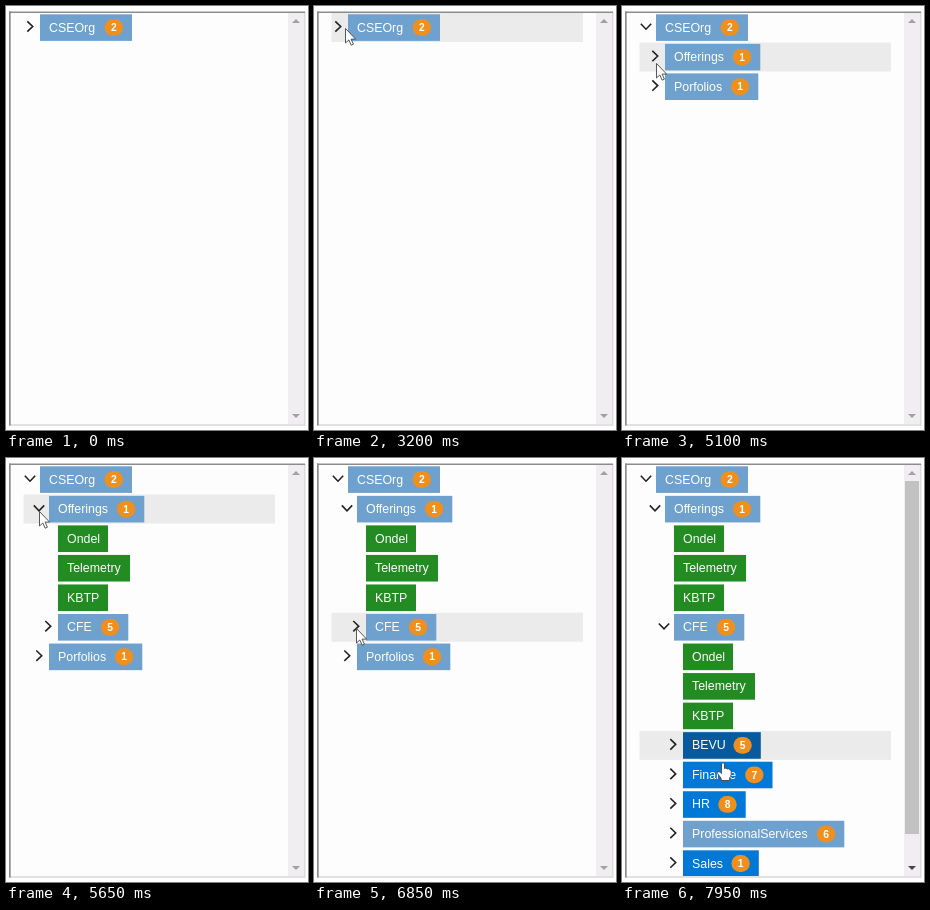
An HTML page with a canvas that plays this animation: 302 by 424 pixels, repeating every 8000 ms.

```html
<!DOCTYPE html>
<html lang="en">
<head>
<meta charset="utf-8">
<title>Tree view</title>
<style>
html, body { margin: 0; width: 100%; height: 100%; overflow: hidden; background: #fff; }
canvas { display: block; width: 302px; height: 424px; }
</style>
</head>
<body>
<canvas id="stage"></canvas>
<script>
const LOOP = 8000, PITCH = 29.54, FIRST_TOP = 8;
const canvas = document.getElementById('stage');
const ctx = canvas.getContext('2d');
const dpr = window.devicePixelRatio || 1;
canvas.width = 302 * dpr;
canvas.height = 424 * dpr;
ctx.scale(dpr, dpr);

// Fill and hover fill per node kind
const COLORS = {
  group: ['#6ea1ce', '#6397c6'],
  leaf: ['#228b22', '#1a651c'],
  unit: ['#0078d7', '#075a9d']
};
const node = (label, kind, width, count, openAt = Infinity, children = []) =>
  ({ label, kind, width, count, openAt, children });
const leaves = () => [node('Ondel', 'leaf', 50), node('Telemetry', 'leaf', 72), node('KBTP', 'leaf', 50)];

const tree = node('CSEOrg', 'group', 92, 2, 3850, [
  node('Offerings', 'group', 95.3, 1, 5550, [
    ...leaves(),
    node('CFE', 'group', 70.3, 5, 6980, [
      ...leaves(),
      node('BEVU', 'unit', 77.8, 5),
      node('Finance', 'unit', 89.5, 7),
      node('HR', 'unit', 62.7, 8),
      node('ProfessionalServices', 'group', 161.3, 6),
      node('Sales', 'unit', 75.8, 1)
    ])
  ]),
  node('Porfolios', 'group', 93.3, 1)
]);

// Pointer path: time, x, y
const PATH = [
  [1250, 254, 299], [1450, 186, 246], [1600, 186, 246], [1650, 185, 246], [1780, 185, 246],
  [2150, 92, 183], [2600, 47, 98], [2900, 36, 40], [3200, 31, 22], [3450, 33, 20],
  [3530, 33, 20], [3650, 24, 18], [4330, 24, 18], [4700, 30, 42], [5100, 34, 57],
  [5300, 33, 53], [6030, 33, 53], [6250, 44, 91.5], [6600, 43, 145], [6850, 42, 170],
  [7080, 42, 170], [7350, 87.5, 194], [7730, 87.5, 194], [7950, 101, 304.5], [8000, 101, 304.5]
];

function pointerAt(t) {
  if (t < PATH[0][0]) return null;
  const i = PATH.findIndex(p => p[0] > t);
  const [t0, x0, y0] = PATH[i - 1], [t1, x1, y1] = PATH[i];
  const k = (t - t0) / (t1 - t0);
  return { x: x0 + (x1 - x0) * k, y: y0 + (y1 - y0) * k };
}

function visibleRows(t, item = tree, depth = 0, rows = []) {
  rows.push({ ...item, depth, open: t >= item.openAt });
  if (t >= item.openAt) item.children.forEach(child => visibleRows(t, child, depth + 1, rows));
  return rows;
}

function rect(x, y, w, h, color) {
  ctx.fillStyle = color;
  ctx.fillRect(x, y, w, h);
}

function text(str, x, y, font, align) {
  ctx.font = font + ' "Liberation Sans", Arial, sans-serif';
  ctx.textAlign = align;
  ctx.fillStyle = '#fff';
  ctx.fillText(str, x, y);
}

function chevron(x, y, open) {
  ctx.save();
  ctx.translate(x, y);
  if (open) ctx.rotate(Math.PI / 2);
  ctx.strokeStyle = '#222';
  ctx.lineWidth = 1.6;
  ctx.stroke(new Path2D('M-2.7 -5.2L2.7 0L-2.7 5.2'));
  ctx.restore();
}

const buttonLeft = row => 34 + row.depth * 9;

function isOverButton(row, top, p) {
  const x = buttonLeft(row);
  return p.x >= x && p.x <= x + row.width && p.y >= top - 2 && p.y <= top + 28;
}

function drawRow(row, index, pointer) {
  const top = FIRST_TOP + index * PITCH, mid = top + 13.3, x = buttonLeft(row);
  const hovered = pointer && pointer.y >= top - 1.2 && pointer.y < top + PITCH - 1.2;
  if (hovered) rect(17.5, top - 1, 251.5, 29, '#ecebec');
  if (row.count) chevron(x - 10, mid - .8, row.open);
  rect(x, top + .3, row.width, 26.6, COLORS[row.kind][hovered && isOverButton(row, top, pointer) ? 1 : 0]);
  text(row.label, x + 9, mid + 4.2, '12.4px', 'left');
  if (row.count) {
    const cx = x + row.width - 18.2;
    ctx.fillStyle = '#ef8f1d';
    ctx.beginPath();
    ctx.roundRect(cx - 9.2, mid - 8.2, 18.4, 16.8, 8.4);
    ctx.fill();
    text(row.count, cx, mid + 3.9, 'bold 10.3px', 'center');
  }
}

function triangle(x, y, direction, color) {
  ctx.fillStyle = color;
  ctx.fill(new Path2D(`M${x - 4} ${y + 2 * direction}h8l-4 ${-4 * direction}z`));
}

function drawScrollbar(overflowing) {
  rect(282, 7, 16, 411, '#f0eef0');
  if (overflowing) rect(283, 23, 14, 353, '#c2c1c2');
  triangle(290, 15, 1, '#a2a1a2');
  triangle(290, 410, -1, overflowing ? '#444' : '#a2a1a2');
}

function drawBorder() {
  rect(3, 418, 296, 2, '#e2e1e2');
  rect(298, 6, 1.5, 414, '#dddcdd');
  rect(3, 5.5, 296, 1.5, '#8c8c8e');
  rect(3, 5.5, 1.7, 414, '#8c8c8e');
}

const ARROW = new Path2D('M.5 .5V15L3.8 12L6.2 17.2L8.4 16.2L6.1 11.1H10.6Z');
const HAND = new Path2D('M-1.5 8V1.2Q0 -.8 1.5 1.2V6Q3 4.8 4.2 6.5Q5.6 5.7 6.6 7.3Q8 7 8.2 8.8V12Q8 14 6.6 15.4V18H-1.8V16L-5.4 11Q-6.2 8.8 -4 9L-1.5 11Z');

function drawPointer(p, isHand) {
  ctx.save();
  ctx.translate(p.x, p.y);
  ctx.fillStyle = '#fff';
  ctx.strokeStyle = '#444';
  ctx.lineWidth = .9;
  const shape = isHand ? HAND : ARROW;
  ctx.fill(shape);
  ctx.stroke(shape);
  ctx.restore();
}

function draw(t) {
  const rows = visibleRows(t), pointer = pointerAt(t);
  const hoverPoint = pointerAt(t - 50); // highlighting trails the pointer slightly
  rect(0, 0, 302, 424, '#fff');
  rect(4, 7, 294, 411, '#fefdfe');
  ctx.save();
  ctx.beginPath();
  ctx.rect(4, 7, 278, 411.5);
  ctx.clip();
  rows.forEach((row, i) => drawRow(row, i, hoverPoint));
  ctx.restore();
  drawScrollbar(FIRST_TOP + rows.length * PITCH > 420);
  drawBorder();
  if (pointer) drawPointer(pointer, rows.some((row, i) => isOverButton(row, FIRST_TOP + i * PITCH, pointer)));
}

const start = performance.now();
function frame() {
  draw((performance.now() - start) % LOOP);
  requestAnimationFrame(frame);
}
frame();
</script>
</body>
</html>
```
